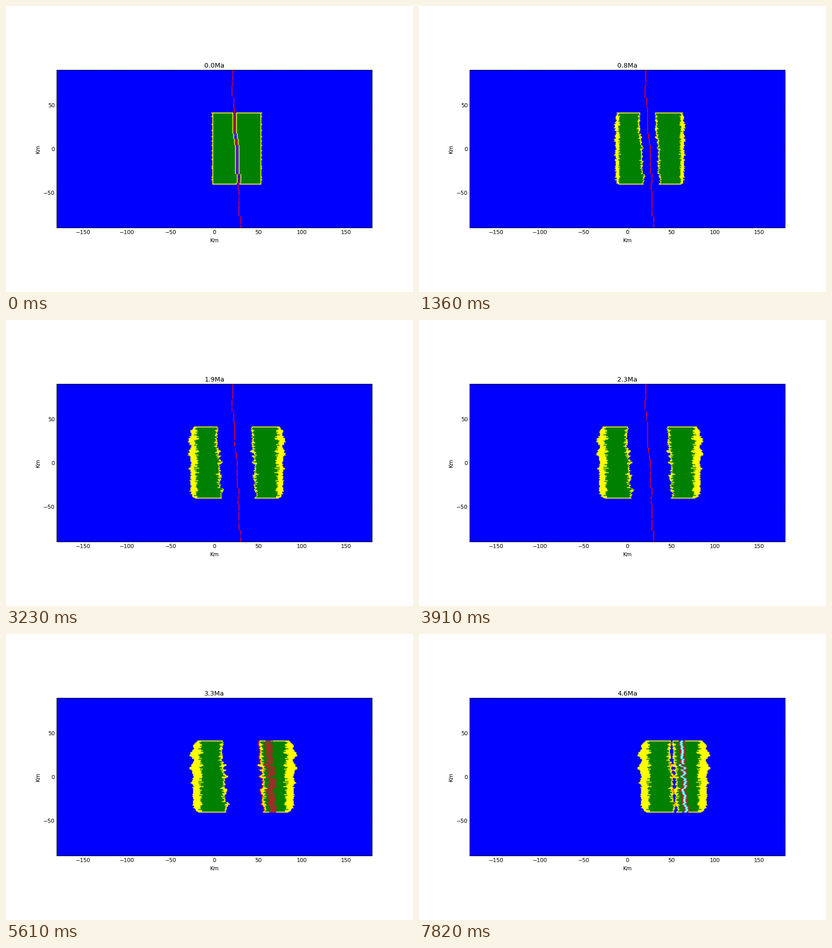
A matplotlib script for the animation above (7.99 s loop, 893 px wide and 627 px high).

```python
import matplotlib.pyplot as plt
import numpy as np
from matplotlib.animation import FuncAnimation

W, H, DPI = 893, 627, 72
FRAMES, STEP_MS = 47, 170
RIFT_END, CLOSE_START, CLOSE_STEPS, CLOSE_SPEED = 29, 30, 11, 5

BLUE, GREEN, YELLOW = (0, 0, 255), (0, 128, 0), (255, 255, 0)
RED, BROWN, CYAN, WHITE = (255, 0, 0), (165, 42, 42), (0, 255, 255), (255, 255, 255)

# Mid-ocean ridge: (northern limit, column) of each straight piece
RIDGE = [(90, 21), (71, 20), (58, 22), (46, 23), (17, 24), (11, 25),
         (4, 26), (-29, 28), (-39, 27), (-47, 28), (-77, 30)]

lat = np.arange(180) - 89.5
lon = np.arange(-180, 181)
belt = slice(49, 131)
rows = lat[belt]


def bump(centre, half_width, height):
    return height * np.maximum(0, 1 - np.abs(rows - centre) / half_width)


def whole(v):
    return np.floor(v + 0.5).astype(int)


ridge = np.array([[x for top, x in RIDGE if y <= top][-1] for y in lat])
rift = ridge[belt]

rng = np.random.default_rng(11)
rough_out = rng.uniform(-0.8, 0.8, rows.size)
rough_in = rng.uniform(-1, 1, rows.size)
teeth_out = np.clip(rng.normal(0.2, 1.8, rows.size), -3.5, 4)
teeth_in = np.clip(rng.normal(0.3, 1.5, rows.size), -3, 3)
threshold = rng.random((rows.size, lon.size))

# Sediment added to each coast by the end of rifting, thinner at the corners
corner = np.sqrt(np.clip((41 - np.abs(rows)) / 6, 0, 1))
outer_growth = corner * (8 + bump(25, 5, 4.5) + bump(10, 6, 4) + bump(-7, 3, 3))
inner_growth = (1.3 + bump(38, 5, 1.5) + bump(13, 2, 4) + bump(7, 2, 2)
                + bump(0, 3, 4.5) + bump(-16, 4, 3.5) + bump(-32, 4, 3))


def coasts(i):
    """Columns of the western block: outer coast, green start, green end, inner coast."""
    s = min(i, RIFT_END)
    age = s / RIFT_END
    width = 1 + outer_growth * age ** 0.75 + rough_out
    outer = -1 - s - np.maximum(whole(width), 1)
    green_a = np.maximum(-1 - s + whole(teeth_out * min(1, age * 1.6)), outer + 1)
    base = rift - 2 - s
    inner = base + whole(inner_growth * age + rough_in * min(1, age * 3))
    green_b = np.minimum(base - 1 + whole(teeth_in * min(1, age * 2.4)), inner - 1)
    return outer, green_a, green_b, inner


def paint_land(land, *edges):
    a, b, c, d = (e[:, None] for e in edges)
    land[(lon >= a) & (lon <= d)] = YELLOW
    green = (lon >= b) & (lon <= c)
    green[[0, -1]] = False
    land[green] = GREEN


def paint_arc(land, i, coast):
    """Volcanic belt that rises behind the trench."""
    off = np.abs(lon - (coast + 10)[:, None])
    reach = 4 if i < 36 else 3
    land[(off <= reach) & (threshold + 0.08 * off < (i - 29) / 4)] = BROWN
    land[(off <= 1) & (threshold < (i - 35) / 3)] = CYAN
    land[(off == 0) & (threshold < (i - 42) / 4)] = WHITE


def world(i):
    grid = np.empty((lat.size, lon.size, 3), np.uint8)
    grid[:] = BLUE
    land = grid[belt]
    a, b, c, d = coasts(i)
    back = CLOSE_SPEED * int(np.clip(i - CLOSE_START, 0, CLOSE_STEPS))
    paint_land(land, a + back, b + back, c + back, d + back)
    # The eastern block mirrors the western one
    coast = 2 * rift - d
    paint_land(land, coast, 2 * rift - c, 51 - b, 51 - a)
    if i < CLOSE_START:
        seen = np.random.default_rng(100 + i).random(lat.size) > 0.09
        grid[np.flatnonzero(seen), ridge[seen] + 180] = RED
    else:
        gap = coast - (d + back)
        trench = (gap < 3) | (i < CLOSE_START + CLOSE_STEPS)
        land[np.flatnonzero(trench), coast[trench] - 1 + 180] = RED
        paint_arc(land, i, coast)
    return grid


plt.rcParams.update({
    "font.family": "DejaVu Sans", "font.size": 12, "axes.linewidth": 1,
    "xtick.direction": "in", "ytick.direction": "in",
    "xtick.top": True, "ytick.right": True,
})
fig = plt.figure(figsize=((W + 0.01) / DPI, (H + 0.01) / DPI), dpi=DPI, facecolor="white")
ax = fig.add_axes([111.2 / W, 140.9 / H, 692 / W, 346 / H])
image = ax.imshow(world(0), origin="lower", extent=(-180, 180, -90, 90),
                  interpolation="bilinear")
ax.set_xticks(range(-150, 151, 50))
ax.set_yticks(range(-50, 51, 50))
ax.tick_params(length=4, width=0.5, pad=4)
ax.set_xlabel("Km", labelpad=5)
ax.set_ylabel("Km", labelpad=5)
title = ax.set_title("0.0Ma", fontsize=14.4, pad=5)


def update(i):
    image.set_data(world(i))
    title.set_text(f"{i / 10:.1f}Ma")
    return image, title


anim = FuncAnimation(fig, update, frames=FRAMES, interval=STEP_MS, repeat=True, repeat_delay=0)
plt.show()
```
